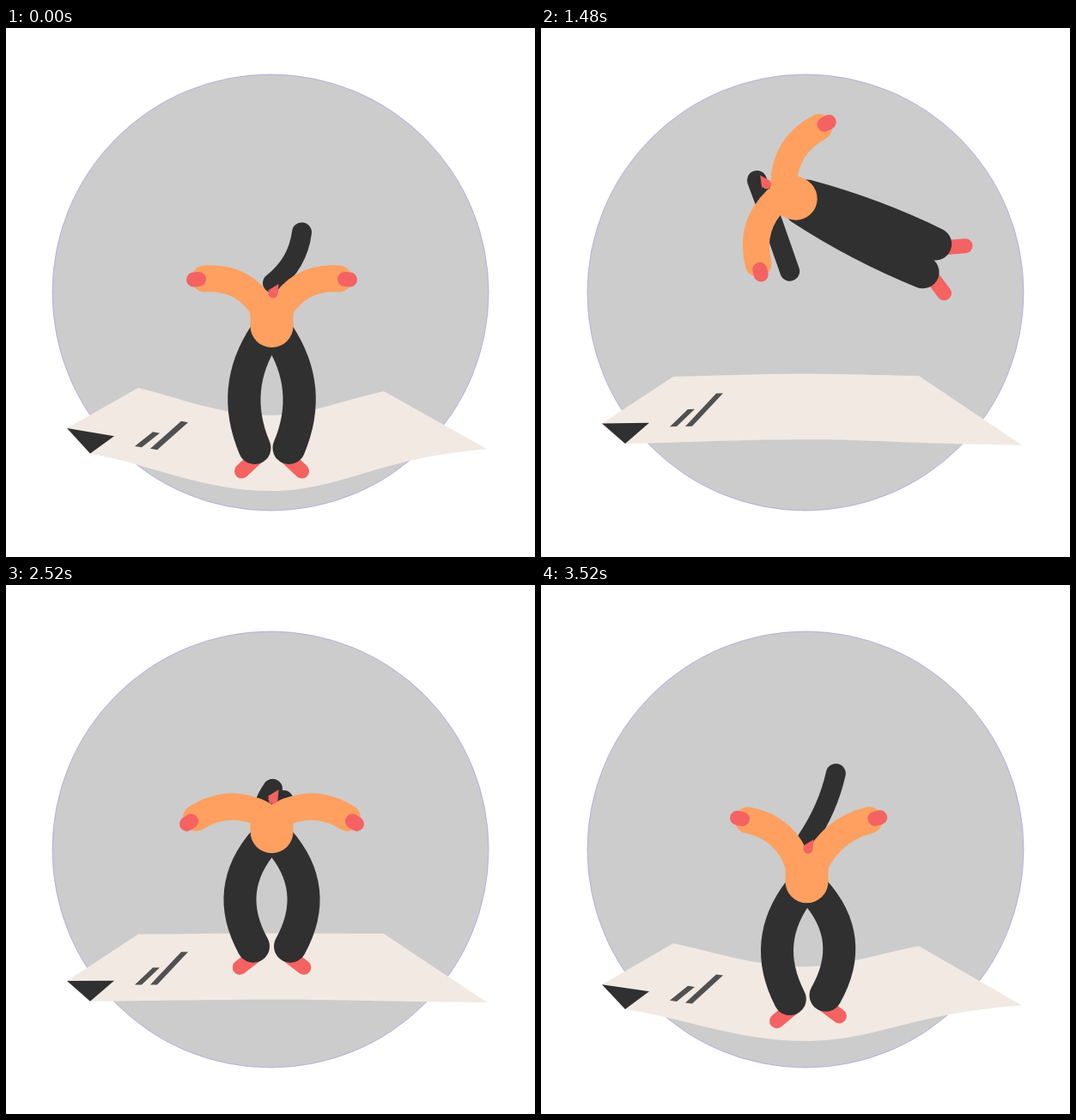
Write an HTML page with a canvas that moves like this. It is 616 px wide and 616 px high and loops after 3.56 s.

```html
<!DOCTYPE html>
<html lang="en">
<head>
<meta charset="utf-8">
<title>Trampoline</title>
<style>
  html, body { margin: 0; width: 100%; height: 100%; overflow: hidden; background: #fff; }
  canvas { display: block; }
</style>
</head>
<body>
<canvas id="stage" width="616" height="616"></canvas>
<script>
const ctx = document.getElementById('stage').getContext('2d');
const LOOP = 3560, STEP = 40, BOUNCE = LOOP / 3, CONTACT = 105, AIR = BOUNCE - 2 * CONTACT;
const DARK = '#303030', SKIN = '#ffa060', PINK = '#f56262', PAPER = '#f2e9e3';
const ARM = 100, LEG = 168, HAIR = 115;

const mix = (a, b, k) => a + (b - a) * k;
const clamp = (x, low, high) => Math.min(high, Math.max(low, x));

// A side is hand x, y, ankle x, y, measured outward from the hips; hair is its tip
const pose = (hair, left, right = left) => [...left, ...right, ...hair];
const crouch = pose([35, -109], [78, -55, 20, 142]);
const push = pose([30, -60], [88, -20, 22, 128]);
const open = pose([-80, 28], [87, -9, 18, 170]);
const land = pose([29, -162], [47, -107, -1 + 20, 120], [61, -107, 31, 106]);
const leap = pose([-25, -72], [102, -55, 80, 127], [71, -100, 160, -2]);
const tuck = pose([-34, -156], [62, -96, 62, 55], [62, -107, -13, 102]);
const split = pose([-26, -81], [67, -91, 168, 48]);

const jumps = [
  { trick: leap, start: 520, end: 640, peak: 126 },
  { trick: tuck, start: 550, end: 973, peak: 127 },
  { trick: split, start: 507, end: 650, peak: 135 }
];
const keys = jumps.flatMap(({ trick, start, end }, i) =>
  [[0, crouch], [CONTACT, push], [290, open], [start, trick], [end, trick], [1080, land]]
    .map(([time, p]) => [time + i * BOUNCE, p]));
keys.push([LOOP, crouch]);

// Monotone cubic interpolation between keys
function poseAt(t) {
  let i = 0;
  while (i < keys.length - 2 && t >= keys[i + 1][0]) i++;
  const slope = (j, c) => {
    const a = keys[j], b = keys[j + 1];
    return a && b ? (b[1][c] - a[1][c]) / (b[0] - a[0]) : 0;
  };
  const tangent = (j, c) => {
    const a = slope(j - 1, c), b = slope(j, c);
    return a * b <= 0 ? 0 : 2 * a * b / (a + b);
  };
  const [start, from] = keys[i], [end, to] = keys[i + 1];
  const span = end - start, u = (t - start) / span, v = 1 - u;
  return from.map((p, c) =>
    p * v * v * (1 + 2 * u) + to[c] * u * u * (3 - 2 * u) +
    span * u * v * (v * tangent(i, c) - u * tangent(i + 1, c)));
}

function bodyAt(t) {
  const jump = Math.floor(t / BOUNCE), phase = t % BOUNCE;
  const press = Math.min(phase, BOUNCE - phase) / CONTACT;
  const turn = jump === 1 ? -2 * Math.PI * clamp((phase - 132) / 880, 0, 1) : 0;
  const x = 309.5 + 14 * Math.sin(turn);
  if (press < 1) return { x, y: 347 - 30 * press ** 3, turn, depth: 55 * (1 - press ** 2) };
  const { peak } = jumps[jump];
  const y = mix(peak, 317, (2 * (phase - CONTACT) / AIR - 1) ** 2);
  return { x, y, turn, depth: -5 * Math.sin(2 * Math.PI * (phase - CONTACT) / AIR) };
}

function polygon(color, points) {
  ctx.fillStyle = color;
  ctx.beginPath();
  points.forEach(p => ctx.lineTo(...p));
  ctx.fill();
}

function disc(color, x, y, r) {
  ctx.fillStyle = color;
  ctx.beginPath();
  ctx.arc(x, y, r, 0, 2 * Math.PI);
  ctx.fill();
}

function line(color, width, x0, y0, x1, y1, cx = x0, cy = y0) {
  ctx.strokeStyle = color;
  ctx.lineWidth = width;
  ctx.lineCap = 'round';
  ctx.beginPath();
  ctx.moveTo(x0, y0);
  ctx.quadraticCurveTo(cx, cy, x1, y1);
  ctx.stroke();
}

// Middle control point of a limb: the shorter its reach, the more it bends
function joint(x0, y0, x1, y1, length, bendiness = () => 1) {
  const dx = x1 - x0, dy = y1 - y0, reach = Math.hypot(dx, dy);
  const bend = Math.max(0, length - reach) * bendiness(dx / reach);
  return { x: (x0 + x1) / 2 + bend * dy / reach, y: (y0 + y1) / 2 - bend * dx / reach, bend };
}

function drawSheet(d) {
  const backLeft = 407 + .22 * d, backRight = 406.5 + .3 * d, back = 406.5 + .81 * d;
  const tip = 485 + .19 * d, right = 486 + .075 * d, front = 484 + d;
  const left = [71, 461 + .09 * d];
  ctx.fillStyle = PAPER;
  ctx.beginPath();
  ctx.moveTo(...left);
  ctx.lineTo(154, backLeft);
  ctx.bezierCurveTo(200, mix(backLeft, back, .35), 250, back, 308, back);
  ctx.bezierCurveTo(350, back, 390, mix(backRight, back, .4), 440, backRight);
  ctx.lineTo(560, right);
  ctx.bezierCurveTo(430, mix(right, front, .22), 390, front, 308, front);
  ctx.bezierCurveTo(230, front, 170, mix(tip, front, .3), 98, tip);
  ctx.fill();
  polygon(DARK, [left, [126, 461 + .26 * d], [98, tip]]);
  const sag = (x, y) => [x, y + d * (.38 + (x - 150) * .003)];
  const bar = (x, y, w, h) =>
    polygon('#505050', [sag(x, y), sag(x + 8, y), sag(x + w + 8, y - h), sag(x + w, y - h)]);
  bar(150, 466, 21, 20);
  bar(168, 466, 36, 38);
}

function drawLeg(x, y) {
  const knee = joint(8, 10, x, y, LEG);
  const shin = Math.atan2(y - knee.y, x - knee.x);
  const foot = shin - clamp(20 + 1.4 * knee.bend, 0, 100) * Math.PI / 180;
  const heelX = x + 10 * Math.cos(shin), heelY = y + 10 * Math.sin(shin);
  line(PINK, 17, heelX, heelY, heelX + 26 * Math.cos(foot), heelY + 26 * Math.sin(foot));
  line(DARK, 38, 8, 10, x, y, knee.x, knee.y);
}

function drawArm(x, y) {
  const elbow = joint(10, -20, x, y, ARM);
  const angle = Math.atan2(y - elbow.y, x - elbow.x);
  const along = r => [x + r * Math.cos(angle), y + r * Math.sin(angle)];
  line(SKIN, 31, 10, -20, x, y, elbow.x, elbow.y);
  line(PINK, 17, ...along(7), ...along(13));
}

function drawHair(x, y) {
  const curl = joint(1, -50, x, y, HAIR, lean => -.6 * lean);
  line(DARK, 23, 1, -50, x, y, curl.x, curl.y);
}

function mirrored(draw, left, right) {
  ctx.save();
  ctx.scale(-1, 1);
  draw(...left);
  ctx.restore();
  draw(...right);
}

function drawFigure(body, p) {
  ctx.save();
  ctx.translate(body.x, body.y);
  ctx.rotate(body.turn);
  mirrored(drawLeg, p.slice(2, 4), p.slice(6, 8));
  drawHair(...p.slice(8));
  disc(SKIN, 0, 0, 25);
  ctx.fillRect(-25, -20, 50, 20);
  mirrored(drawArm, p.slice(0, 2), p.slice(4, 6));
  disc(PINK, 1.5, -38, 5.5);
  polygon(PINK, [[-5, -41], [8, -49], [7, -38]]);
  ctx.restore();
}

function frame() {
  const t = Math.floor(performance.now() % LOOP / STEP) * STEP;
  const body = bodyAt(t);
  ctx.clearRect(0, 0, 616, 616);
  disc('#ccc', 308, 308, 254);
  ctx.strokeStyle = '#a99be0';
  ctx.lineWidth = .7;
  ctx.stroke();
  drawSheet(body.depth);
  drawFigure(body, poseAt(t));
  requestAnimationFrame(frame);
}
frame();
</script>
</body>
</html>
```
